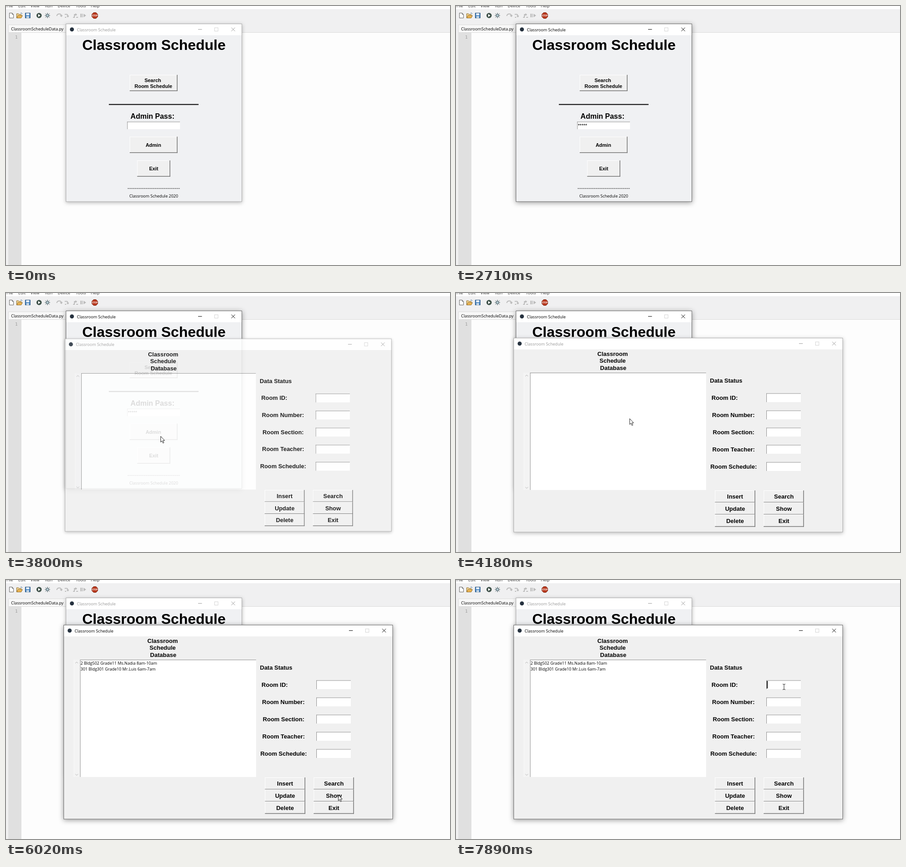
Recreate the animation shown at these times as an HTML page. Size 980 by 572 pixels, loop 8000 ms.

```html
<!DOCTYPE html>
<html lang="en">
<head>
<meta charset="utf-8">
<title>Classroom Schedule</title>
<style>
  html, body { margin: 0; width: 100%; height: 100%; overflow: hidden; background: #fdfdfd; }
  svg { display: block; }
  text { font: 9.1px "Open Sans", sans-serif; white-space: pre; }
  .bold { font-family: "Liberation Sans", Arial, sans-serif; font-weight: bold; }
  .mid { text-anchor: middle; }
  .frame { stroke: #6b6b6b; filter: drop-shadow(0 2px 6px rgba(0, 0, 0, .4)); }
  .off .frame { stroke: #adadad; filter: drop-shadow(0 2px 4px rgba(0, 0, 0, .28)); }
  .controls { fill: none; stroke: #000; }
  .off .caption { fill: #999; }
  .off .controls { stroke: #999; }
  .lit { fill: #fff; }
  .dark { fill: #747474; }
  .pressed .lit { fill: #747474; }
  .pressed .dark { fill: #fff; }
  .pressed text { transform: translate(1px, 1px); }
</style>
</head>
<body>
<svg id="stage" width="980" height="572" viewBox="0 0 980 572"></svg>
<script>
const rect = (x, y, w, h, fill, extra = '') =>
  `<rect x="${x}" y="${y}" width="${w}" height="${h}" fill="${fill}" ${extra}/>`;
const path = (d, fill, stroke = 'none', extra = '') =>
  `<path d="${d}" fill="${fill}" stroke="${stroke}" ${extra}/>`;
const label = (x, y, str, extra = '') => `<text x="${x}" y="${y}" ${extra}>${str}</text>`;
const bold = (x, y, size, str, align = 'mid') =>
  label(x, y, str, `class="bold ${align}" style="font-size:${size}px"`);

// Sunken white field
const field = (x, y, w, h) =>
  rect(x, y, w, h, '#fff') + rect(x, y, w, 1, '#8f8f8f') + rect(x, y, 1, h, '#8f8f8f');

// Raised button; lines are [centre x, baseline, text]
const button = (id, x, y, w, h, size, ...lines) => `<g id="${id}">` +
  rect(x, y, w, h, '#f0f0f0') +
  rect(x, y, w, 1, '', 'class="lit"') + rect(x, y, 1, h, '', 'class="lit"') +
  rect(x, y + h - 1.5, w, 1.5, '', 'class="dark"') +
  rect(x + w - 1.5, y, 1.5, h, '', 'class="dark"') +
  lines.map(([cx, base, str]) => bold(cx, base, size, str)).join('') + '</g>';

const appWindow = (id, x, y, w, h, fill, content) => {
  const right = x + w, cy = y + 12.2;
  return `<g id="${id}">` + rect(x, y, w, h, fill, 'class="frame"') +
    rect(x + .5, y + .5, w - 1, 24.5, '#fff') +
    `<circle cx="${x + 13}" cy="${cy}" r="4.5" fill="#26323f"/>` +
    label(x + 24, y + 16, 'Classroom Schedule', 'class="caption"') +
    `<path class="controls" d="M${right - 96.5} ${cy}h8.5M${right - 23} ${cy - 4}l8 8m0-8l-8 8"/>` +
    rect(right - 60, cy - 3.7, 7.5, 7.5, 'none', 'stroke="#d4d4d4"') + content + '</g>';
};

const menu = [[1, 'File'], [27, 'Edit'], [54, 'View'], [86, 'Run'], [114, 'Device'], [154, 'Tools'], [187, 'Help']];
const ide =
  rect(0, 0, 980, 572, '#fdfdfd') + rect(0, 7, 980, 51, '#f0f0f1') + rect(0, 0, 980, 7, '#fff') +
  menu.map(([x, str]) => label(x, 3.3, str, 'fill="#333"')).join('') +
  rect(0, 58, 5, 514, '#f0f0f0') + rect(5, 58, 29, 514, '#e0e0e0') +
  rect(5.5, 41.5, 133, 17, '#f8f8f8', 'stroke="#dcdcdc"') + rect(133, 58, 847, 1, '#dadada') +
  label(11.3, 54, 'ClassroomScheduleData.py') +
  label(20, 72, '1', 'fill="#999" style="font:9.5px DejaVu Sans Mono,monospace"') +
  path('M7.5 15.5h6l3 3v8h-9zM13.5 15.5v3h3', '#fff', '#666') +
  path('M23.5 26V17h4l1 1.5h5V21', '#f3d592', '#8a6a2c') +
  path('M23.5 26.5l3-5.5h10l-3 5.5z', '#f0b752', '#8a6a2c') +
  path('M32 16q3-2 4 1.5', 'none', '#3f6f9f') +
  path('M42.5 15.5h11v11h-11z', '#4681bd', '#2a5480') + rect(44.5, 16, 7, 4.5, '#e9f1f8') +
  rect(45, 22.5, 6, 4, '#d4e1ec') +
  '<circle cx="73" cy="21" r="5.8" fill="#3e5149"/>' + path('M71 17.8v6.4l5-3.2z', '#fff') +
  path('M91.5 15v12M85.5 21h12M87 16.5l9 9M96 16.5l-9 9', 'none', '#4c5e66') +
  '<circle cx="91.5" cy="21" r="3" fill="#b5cbd2" stroke="#40545c"/>' +
  path('M112 22q1-4.500 5.500-4.500t5 5m-3-1.500l3 2 1.500-3M129.500 18.500h5q2 0 2 5m-2-2l2 2.500 2-2.500M130 25h3M148 25h3v-6h4m-2-2l2.500 2-2.500 2M155 25h4',
    'none', '#bcbcbc', 'stroke-width="2"') +
  path('M164 17h2v8h-2zM167 17h2v8h-2zM171 17v8l6-4z', '#bcbcbc') +
  path('M193.300 14.500h5.400l3.800 3.800v5.400l-3.800 3.800h-5.400l-3.800-3.800v-5.400z', '#b8391e', '#7c2a18') +
  `<g fill="#fff">${bold(196, 23, 4.8, 'STOP')}</g>`;

const login = appWindow('login', 132.5, 39.5, 388, 392.5, '#f0f1f3',
  bold(326.5, 97, 32, 'Classroom Schedule') +
  button('find', 273, 152, 105.5, 36, 11, [324, 168, 'Search'], [325.3, 181, 'Room Schedule']) +
  rect(227, 216.5, 198, 2, '#000') +
  bold(323.3, 249, 16, 'Admin Pass:') + field(267.5, 255.500, 116.5, 16.5) +
  `<text id="stars" class="bold" x="269" y="268" style="font-size:10.5px;font-weight:normal"></text>` +
  rect(268, 257, 1.8, 14, '#000', 'id="passCaret"') +
  button('admin', 273, 288.5, 105.5, 36, 11, [325.3, 311, 'Admin']) +
  button('quit', 289.5, 341, 73, 36, 11, [326, 363, 'Exit']) +
  path('M268.500 403h116', 'none', '#222', 'stroke-dasharray="3 1"') +
  label(326, 422.5, 'Classroom Schedule 2020', 'class="mid" style="font-size:9px"'));

const rows = [[593, 'ID'], [612.3, 'Number'], [612.7, 'Section'], [612.7, 'Teacher'], [612.7, 'Schedule']];
const actions = [['Insert', 'Search'], ['Update', 'Show'], ['Delete', 'Exit']];
const database = appWindow('database', 127.5, 99.5, 726, 428.5, '#f0f0f0',
  bold(345.7, 139, 13, 'Classroom') + bold(345.7, 154, 13, 'Schedule') + bold(347, 169.5, 13, 'Database') +
  rect(150, 176, 14, 259, '#f3f3f3') + rect(149.5, 176, 1, 259, '#fafafa') +
  path('M153 184l3-3 3 3M153 428.500l3 3 3-3', 'none', '#b5b5b5') +
  field(163.5, 176, 388.5, 259) +
  `<g id="records">${['2 Bldg502 Grade11 Ms.Nadia 8am-10am', '301 Bldg301 Grade10 Mr.Luis 6am-7am']
    .map((str, i) => label(164.5, 186.5 + 13 * i, str, 'style="font-size:9px"')).join('')}</g>` +
  bold(560.5, 197.7, 13, 'Data Status', '') +
  rows.map(([x, name], i) => bold(x, 235.5 + 38 * i, 13, `Room ${name}:`) +
    field(685, 221.5 + 38 * i, 76, 19.5)).join('') +
  rect(686, 223, 1.8, 16.5, '#000', 'id="idCaret"') +
  actions.map((pair, i) => pair.map((name, j) =>
    button('act' + name, 571.5 + 107.5 * j, 436 + 26.7 * i, 89, 27, 13,
      [616 + 107.7 * j, 454.3 + 26.6 * i, name])).join('')).join(''));

const pointer = '<circle id="glow" r="9.8" fill="#fff200" fill-opacity=".78"/><g id="pointer">' +
  path('M.5.500V13.300L3.300 10.700 5.500 15.600 7.500 14.700 5.400 9.900H9.300z', '#fff', '#222', 'id="arrow"') +
  path('M-3-6h2L0-5 1-6h2M0-5V5M-3 6h2L0 5 1 6h2', 'none', '#222', 'id="beam"') + '</g>';

document.getElementById('stage').innerHTML = ide + login + database + pointer;
const el = id => document.getElementById(id);
const show = (id, on) => { el(id).style.display = on ? '' : 'none'; };

// Linear interpolation of [time, ...values] keys
function track(keys, t) {
  const i = keys.findIndex(k => k[0] > t);
  if (i < 0) return keys[keys.length - 1].slice(1);
  if (i === 0) return keys[0].slice(1);
  const a = keys[i - 1], b = keys[i], p = (t - a[0]) / (b[0] - a[0]);
  return a.slice(1).map((v, n) => v + (b[n + 1] - v) * p);
}

const route = [
  [95, 896, 554], [330, 780, 455], [560, 600, 345], [720, 470, 296], [870, 389, 272], [1000, 374.5, 262.5],
  [2880, 374.5, 262.5], [3030, 341, 316], [4080, 341, 316], [4200, 385, 275], [4400, 510, 236],
  [4600, 645, 272], [4760, 735, 345], [4890, 761, 383], [5044, 755, 435], [5200, 752, 446],
  [5320, 752, 446], [5660, 733, 474], [6400, 733, 474], [6800, 732, 370], [7210, 722, 256],
  [7350, 724, 236]
];
const opening = [[3630, 0, .96], [3653, .03, .962], [3730, .5, .98], [3807, .86, .992], [3885, 1, 1]];
const STEP = 77.3;

function draw(now) {
  const tick = Math.floor(now % 8000 / STEP + .22), t = tick * STEP + 20;
  const within = (from, to) => t >= from && t < to;

  el('login').classList.toggle('off', !within(1080, 5720));
  el('database').classList.toggle('off', t < 5720);
  const [alpha, scale] = track(opening, t);
  el('database').setAttribute('opacity', alpha);
  el('database').setAttribute('transform', `translate(490.5 314) scale(${scale}) translate(-490.5 -314)`);

  const typed = tick >= 29 ? 5 : Math.max(0, Math.min(4, tick - 23));
  el('stars').textContent = '*'.repeat(typed);
  el('passCaret').setAttribute('x', 268 + 4.1 * typed);
  show('passCaret', within(1080, 2710));
  show('idCaret', t >= 7490);
  show('records', t >= 6020);
  el('admin').classList.toggle('pressed', within(3000, 3090));
  el('actShow').classList.toggle('pressed', within(5720, 6020));

  const [x, y] = track(route, t);
  const beam = within(920, 2900) || t >= 7260;
  el('pointer').setAttribute('transform', `translate(${x} ${y})`);
  show('pointer', t > 80 && !within(1540, 2860));
  show('beam', beam);
  show('arrow', !beam);
  el('glow').setAttribute('cx', beam ? x - 2 : x);
  el('glow').setAttribute('cy', beam ? y - 1 : y);
  el('glow').setAttribute('opacity', track([[7700, 1], [7904, 0]], t)[0]);
  show('glow', within(1080, 1310) || within(3000, 3240) || within(5720, 6020) || t >= 7490);
}

(function loop() {
  draw(performance.now());
  requestAnimationFrame(loop);
})();
</script>
</body>
</html>
```
